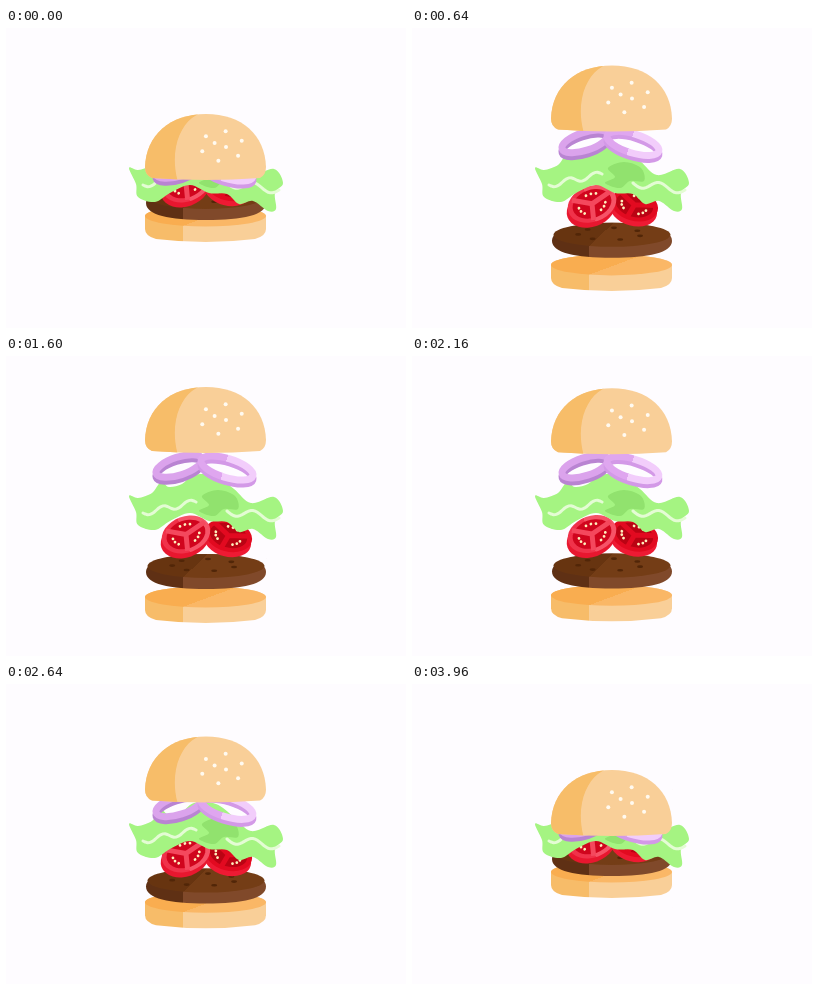
Animation of 400x300 px, one loop 4000 ms. Source, as an HTML page:

```html
<!DOCTYPE html>
<html lang="en">
<head>
<meta charset="utf-8">
<title>Burger layers</title>
<style>
  html, body { margin: 0; width: 100%; height: 100%; overflow: hidden; background: #fefcff; }
  svg { display: block; width: 100vw; height: 100vh; }
</style>
</head>
<body>
<svg viewBox="0 0 400 300">
  <defs id="defs">
    <path id="dome" d="M146 150Q139 147 139 139C140 107 164 86 200 86S259 107 260 139Q260 147 254 150Q200 154 146 150Z"/>
    <clipPath id="domeClip"><use href="#dome"/></clipPath>
  </defs>

  <g id="bottomBun">
    <path fill="url(#bunSide)" d="M139 188A60.5 10.5 0 0 1 260 188V201Q260 208 249 211Q200 217 150 211Q139 208 139 201Z"/>
    <ellipse cx="199.5" cy="188" rx="60.5" ry="10.5" fill="url(#bunFace)"/>
  </g>

  <g id="patty">
    <path fill="url(#meatSide)" d="M140 175C140 163 166 157 200 157S260 163 260 175S237 192 200 192S140 187 140 175Z"/>
    <ellipse cx="200" cy="169" rx="58.5" ry="12" fill="url(#meatFace)"/>
    <g id="pits" fill="#512608"></g>
  </g>

  <g id="tomatoes"></g>
  <g id="lettuce"></g>
  <g id="onions"></g>

  <g id="topBun">
    <use href="#dome" fill="#f9cf98"/>
    <path clip-path="url(#domeClip)" d="M130 80H202Q192 86 186 90C172 101 164 126 172 154H130Z" fill="#f7bd69"/>
    <g id="sesame" fill="#fffaf0"></g>
  </g>
</svg>
<script>
const byId = id => document.getElementById(id);
const dot = (x, y, rx, ry = rx) => `<ellipse cx="${x}" cy="${y}" rx="${rx}" ry="${ry}"/>`;

// Points spread evenly around an ellipse, starting at an angle in degrees.
const around = (count, cx, cy, rx, ry, startDeg = 0) => Array.from({length: count}, (_, i) => {
  const a = (startDeg + i * 360 / count) * Math.PI / 180;
  return [cx + rx * Math.cos(a), cy + ry * Math.sin(a)];
});

// Two flat tones with a hard border; lean slants the border.
const twoTone = (id, left, right, at, lean = 0) =>
  `<linearGradient id="${id}" x2="1" y2="${lean}">
    <stop offset="${at}" stop-color="${left}"/><stop offset="${at}" stop-color="${right}"/></linearGradient>`;
byId("defs").insertAdjacentHTML("beforeend",
  twoTone("bunSide", "#f7bc69", "#f9cf98", .31) +
  twoTone("bunFace", "#f9ad50", "#fab766", .63, .47) +
  twoTone("meatSide", "#5f3014", "#80492a", .31) +
  twoTone("meatFace", "#673410", "#743d16", .49, .21) +
  twoTone("tomatoLit", "#f0324a", "#f65367", .45) +
  twoTone("onionLit", "#dfa6ef", "#f2cdfb", .45));

byId("sesame").innerHTML = [...around(6, 216, 118, 21, 15, 40), [208.6, 115], [220, 119]]
  .map(([x, y]) => dot(x, y, 2)).join("");
byId("pits").innerHTML = around(7, 198, 168, 32, 6, 20).map(([x, y]) => dot(x, y, 3, 1.3)).join("");

function tomato(x, y, rx, ry, tilt, rim, side, flesh) {
  const spokes = around(3, 0, 0, rx - 2, ry - 2, 100).map(end => `M0 0L${end}`).join("");
  const seeds = [-22, 0, 22].flatMap(turn => around(3, 0, 0, rx * .55, ry * .55, 40 + turn));
  return `<g transform="translate(${x} ${y}) rotate(${tilt})">
    <g fill="${side}" transform="rotate(${-tilt}) translate(-1 5) rotate(${tilt})">${dot(0, 0, rx, ry)}</g>
    <g fill="${rim}">${dot(0, 0, rx, ry)}</g>
    <g fill="${flesh}">${dot(0, 0, rx - 5, ry - 4)}</g>
    <path d="${spokes}" stroke="${rim.startsWith("#") ? rim : "#f4485d"}" stroke-width="5"/>
    <g fill="#fff0bd">${seeds.map(([sx, sy]) => dot(sx, sy, 1.4)).join("")}</g></g>`;
}
byId("tomatoes").innerHTML =
  tomato(222.5, 156.5, 24, 16, 15, "#e20a20", "#ee1a33", "#ba0313") +
  tomato(180, 155.5, 25, 18, -20, "url(#tomatoLit)", "#e8172f", "#d0051d");

// Closed smooth curve through the key points.
function smooth(points) {
  const at = i => points[(i + points.length) % points.length];
  const ease = (p, from, to) => p.map((v, k) => v + (to[k] - from[k]) / 6);
  return `M${at(0)}` + points.map((p, i) =>
    `C${ease(p, at(i - 1), at(i + 1))} ${ease(at(i + 1), at(i + 2), p)} ${at(i + 1)}`).join("") + "Z";
}
// Sine line between two ends.
const wave = (x0, y0, x1, y1, amp, cycles) => "M" + Array.from({length: 25}, (_, i) => {
  const u = i / 24;
  return [x0 + (x1 - x0) * u, y0 + (y1 - y0) * u + amp * Math.sin(u * cycles * 2 * Math.PI)];
}).join("L");

const leaf = [[123, 140], [132, 142], [146, 137], [155, 126], [163, 131], [176, 128], [188, 119], [210, 120],
  [228, 133], [245, 147], [268, 141], [277, 155], [269, 165], [270, 181], [262, 183], [247, 173], [233, 176],
  [221, 166], [203, 165], [184, 157], [164, 165], [149, 174], [132, 169], [130, 156]];
const fold = [[196, 140], [212, 134], [229, 140], [232, 153], [218, 153], [208, 160], [193, 155], [203, 149]];
byId("lettuce").innerHTML = `
  <path d="${smooth(leaf)}" fill="#a5f482"/>
  <path d="${smooth(fold)}" fill="#91e26e"/>
  <g fill="none" stroke="#e4fcd4" stroke-width="3" stroke-linecap="round">
    <path d="${wave(137, 157, 190, 146, 3, 2)}"/>
    <path d="${wave(221, 155, 273, 162, 4, 1.5)}"/>
  </g>`;

function onion(x, y, rx, ry, tilt, face, side) {
  const loop = (dy, color) => `<ellipse rx="${rx}" ry="${ry}" stroke="${color}"
    transform="translate(${x} ${y + dy}) rotate(${tilt})"/>`;
  return `<g fill="none" stroke-width="7">${loop(4, side)}${loop(0, face)}</g>`;
}
byId("onions").innerHTML =
  onion(173, 139, 24, 9, -18, "#dba3ec", "#b984d2") +
  onion(221, 141, 27, 9.5, 17, "url(#onionLit)", "#d399e7");

// Vertical travel from stacked to spread, with the ease-out power for opening and closing.
const layers = {
  topBun: {travel: -55, open: 2.1, close: 2.1},
  onions: {travel: -29, open: 2.1, close: 2.1},
  tomatoes: {travel: 23, open: 2.1, close: 2.1},
  patty: {travel: 41, open: 2.5, close: 2.5},
  bottomBun: {travel: 53, open: 2.5, close: 1.9}
};
const clamp = v => Math.max(0, Math.min(1, v));

function draw(now) {
  const t = Math.floor(now % 4000 / 40) * 40;
  const opening = t < 2000;
  const u = clamp((opening ? t : 3000 - t) / 1000);
  for (const [id, {travel, open, close}] of Object.entries(layers)) {
    const spread = 1 - (1 - u) ** (opening ? open : close);
    byId(id).setAttribute("transform", `translate(0 ${travel * spread})`);
  }
}

let start;
function tick(now) {
  start ??= now;
  draw(now - start);
  requestAnimationFrame(tick);
}
draw(0);
requestAnimationFrame(tick);
</script>
</body>
</html>
```
